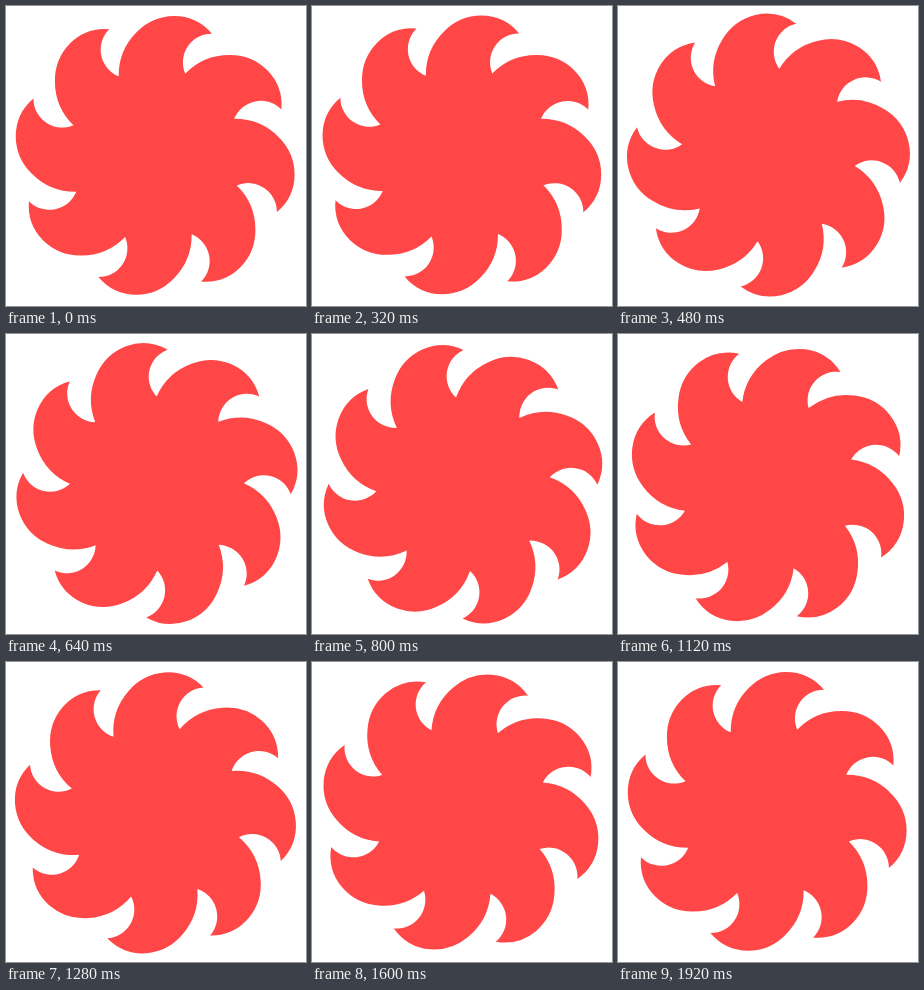
Recreate the animation shown at these times as an HTML page. Size 300 px wide and 300 px high, loop 1960 ms.

```html
<!DOCTYPE html>
<html lang="en">
<head>
<meta charset="utf-8">
<title>Spinning blade</title>
<style>
  html, body { margin: 0; width: 100%; height: 100%; overflow: hidden; background: #fff; }
  svg { display: block; width: 100vw; height: 100vh; }
</style>
</head>
<body>
<svg viewBox="0 0 300 300"><path id="blade" fill="#ff4747"/></svg>
<script>
const BLADES = 8, FRAME = 40, LOOP = 1960, TURN = 1920;
const TIP_ANGLE = 25;
const blade = document.getElementById('blade');
const rad = deg => deg * Math.PI / 180;

function polar(r, deg) {
  const a = rad(deg + TIP_ANGLE);
  return (r * Math.cos(a)).toFixed(2) + ' ' + (r * Math.sin(a)).toFixed(2);
}

const arc = (radius, sweep, r, deg) => `A${radius} ${radius} 0 0 ${sweep} ${polar(r, deg)}`;

// Each blade: a tightening outer curve to the tip, then a hollow back to the valley.
let d = 'M' + polar(87, -49.8);
for (let i = 0; i < BLADES; i++) {
  const a = i * 360 / BLADES;
  d += arc(61.5, 1, 124.7, a - 33.5)
     + arc(53, 1, 140.7, a - 17.3)
     + arc(49.5, 1, 134.3, a)
     + arc(28.8, 0, 87, a - 4.8);
}
blade.setAttribute('d', d + 'Z');

// One full turn whose speed swells in the middle and never stops.
function spin(t) {
  const p = 2 * Math.PI * t;
  return 360 * t + 6.86
    - 7.68 * Math.cos(p) - 19.08 * Math.sin(p)
    + 0.82 * Math.cos(2 * p) - 0.95 * Math.sin(2 * p);
}

const start = performance.now();
function draw() {
  const ms = (performance.now() - start) % LOOP;
  const t = Math.floor(ms / FRAME) * FRAME / TURN;
  // The blade sits slightly off its axle, so it wobbles.
  blade.setAttribute('transform',
    `translate(150 150) rotate(${spin(t).toFixed(3)}) translate(-.83 -.65)`);
  requestAnimationFrame(draw);
}
draw();
</script>
</body>
</html>
```
